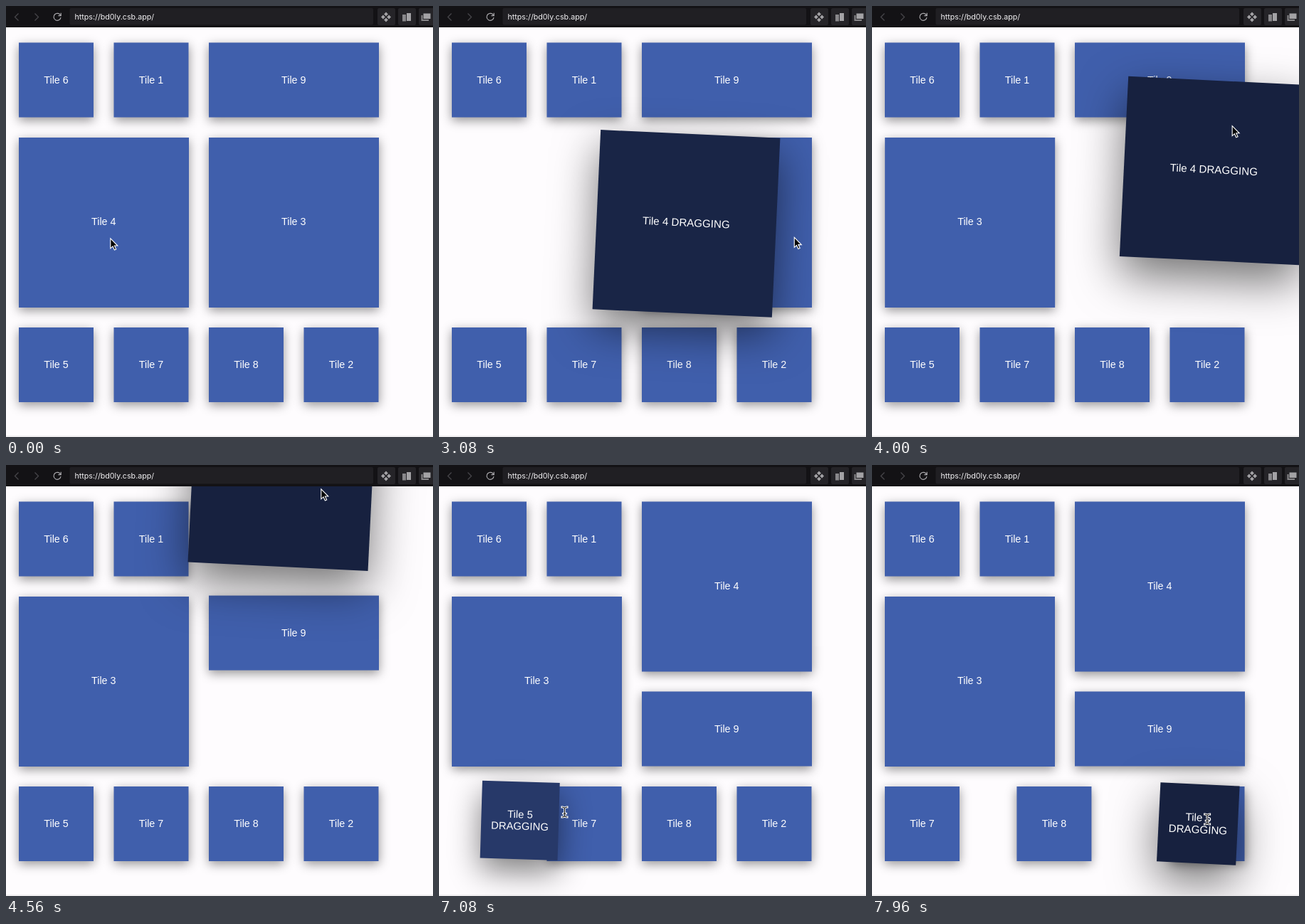
Animation, 600 px wide and 606 px high, one loop 8000 ms. Source, as an HTML page:

```html
<!DOCTYPE html>
<html lang="en">
<head>
<meta charset="utf-8">
<title>Draggable tiles</title>
<style>
  html, body { margin: 0; width: 100%; height: 100%; overflow: hidden; background: #fefcfe; }
  #stage { position: relative; width: 600px; height: 606px; overflow: hidden; }
  .tile {
    position: absolute; left: 0; top: 0;
    display: flex; align-items: center; justify-content: center; text-align: center;
    color: #fff; font: 14.3px/15.7px "Liberation Sans", Arial, sans-serif;
  }
  svg { position: absolute; left: 0; top: 0; z-index: 10; pointer-events: none; }
</style>
</head>
<body>
<div id="stage">
  <svg width="600" height="606" viewBox="0 0 600 606">
    <rect y="604.5" width="600" height="1" fill="#e2e0e2"/>
    <rect width="600" height="30" fill="#131215"/>
    <rect x="89.5" y="3" width="426.5" height="23.5" rx="2" fill="#201f23"/>
    <g fill="none" stroke="#47464a" stroke-width="1.3">
      <path d="M17.5 10.5L12.5 15.5L17.5 20.5"/>
      <path d="M40.5 10.5L45.5 15.5L40.5 20.5"/>
      <path d="M76.6 13.2A5 5 0 1 0 77 16.2M77.2 9.8V13.6H73.4" stroke="#aaa9ad" stroke-width="1.2"/>
    </g>
    <text x="96.5" y="19" fill="#f3f2f4" font-family="Inter, sans-serif" font-size="10.7">https://bd0ly.csb.app/</text>
    <g fill="#252428">
      <rect x="522" y="3" width="25" height="24" rx="2"/>
      <rect x="551" y="3" width="25" height="24" rx="2"/>
      <rect x="580" y="3" width="25" height="24" rx="2"/>
    </g>
    <g fill="#a3a2a5">
      <path d="M534 8.5l2.9 2.9-2.9 2.9-2.9-2.9zM534 16.7l2.9 2.9-2.9 2.9-2.9-2.9zM529.9 12.6l2.9 2.9-2.9 2.9-2.9-2.9zM538.1 12.6l2.9 2.9-2.9 2.9-2.9-2.9z"/>
      <rect x="557" y="12" width="7" height="9.5" fill="#88878a"/>
      <rect x="562.5" y="9.5" width="7" height="12" stroke="#252428"/>
      <rect x="583.5" y="13" width="10.5" height="8" fill="#88878a"/>
      <rect x="586" y="10" width="11" height="8.5" stroke="#252428"/>
    </g>
    <g id="cursor">
      <path id="arrow" d="M.8 .8V14.8L4 11.9L6.4 17L8.7 16L6.4 11H10.8Z" fill="#000" stroke="#fff" stroke-width="1.1"/>
      <g id="beam" fill="none">
        <path id="beamLine" d="M-3.6 -7Q0 -7 0 -4.5V4.5Q0 7 -3.6 7M3.6 -7Q0 -7 0 -4.5V4.5Q0 7 3.6 7M-2 2.2H2" stroke="#fff" stroke-width="2.8" stroke-linecap="square"/>
        <use href="#beamLine" id="beamCore"/>
        <path d="M-3.6 -7Q0 -7 0 -4.5V4.5Q0 7 -3.6 7M3.6 -7Q0 -7 0 -4.5V4.5Q0 7 3.6 7M-2 2.2H2" stroke="#111" stroke-width="1.1"/>
      </g>
    </g>
  </svg>
</div>
<script>
const LOOP = 8000, PITCH = 133.5, CELL = 105;
const FOLLOW = 0.016, LIFT = 0.009;
const BEAM_FROM = 6400;

// Pointer path: time, x, y
const path = [
  [0, 146, 326], [300, 146, 326], [1900, 326, 318], [2160, 326, 318],
  [2480, 193.5, 322.5], [2600, 193.5, 322.5], [3250, 562, 325], [3560, 565, 325],
  [3700, 565, 325], [4270, 449, 34], [4560, 442, 33], [4960, 450, 14],
  [5080, 450, 14], [5660, 216, 118], [5900, 216, 118], [6440, 72, 497],
  [6850, 72, 497], [7080, 176, 488], [7500, 422, 494], [7960, 471, 498], [8060, 481, 499]
];

// Tiles: number, column, row, width and height in cells, later moves (time, columns, rows), drag span
const tiles = [
  { n: 6, c: 0, r: 0, w: 1, h: 1 },
  { n: 1, c: 1, r: 0, w: 1, h: 1 },
  { n: 9, c: 2, r: 0, w: 2, h: 1, moves: [[4150, 0, 1], [5060, 0, 1]] },
  { n: 4, c: 0, r: 1, w: 2, h: 2, drag: [2580, 5060], drop: [2, -1] },
  { n: 3, c: 2, r: 1, w: 2, h: 2, moves: [[3385, -2, 0]] },
  { n: 5, c: 0, r: 3, w: 1, h: 1, drag: [6850, LOOP] },
  { n: 7, c: 1, r: 3, w: 1, h: 1, moves: [[7250, -1, 0]] },
  { n: 8, c: 2, r: 3, w: 1, h: 1, moves: [[7832, -1, 0]] },
  { n: 2, c: 3, r: 3, w: 1, h: 1 }
];

const $ = id => document.getElementById(id);
const mix = (a, b, k) => a + (b - a) * k;
const clamp = (v, lo, hi) => Math.min(hi, Math.max(lo, v));
const size = cells => CELL + (cells - 1) * PITCH;

// Critically damped step response
const spring = (t, rate) => t <= 0 ? 0 : 1 - (1 + rate * t) * Math.exp(-rate * t);

const slope = (i, k) => (path[i + 1][k] - path[i][k]) / (path[i + 1][0] - path[i][0]);

function tangent(i, k) {
  if (i === 0 || i === path.length - 1) return 0;
  const a = slope(i - 1, k), b = slope(i, k);
  return a * b <= 0 ? 0 : 2 * a * b / (a + b);
}

// Monotone cubic through the path points
function pointer(t) {
  let i = 0;
  while (i < path.length - 2 && path[i + 1][0] <= t) i++;
  const span = path[i + 1][0] - path[i][0];
  const u = clamp((t - path[i][0]) / span, 0, 1), v = 1 - u;
  return [1, 2].map(k =>
    path[i][k] * v * v * (1 + 2 * u) + path[i + 1][k] * u * u * (3 - 2 * u) +
    span * (tangent(i, k) * u * v * v - tangent(i + 1, k) * u * u * v));
}

// Pointer travel since the grab, smoothed by the follow spring
function dragOffset(t, [from, to]) {
  if (t <= from) return [0, 0];
  const start = pointer(from);
  let x = 0, y = 0, total = 0;
  for (let s = 2; s < 520; s += 4) {
    const weight = s * Math.exp(-FOLLOW * s);
    const p = pointer(clamp(t - s, from, to));
    x += (p[0] - start[0]) * weight;
    y += (p[1] - start[1]) * weight;
    total += weight;
  }
  return [x / total, y / total];
}

function position(tile, t) {
  let x = 18 + tile.c * PITCH, y = 51.5 + tile.r * PITCH;
  for (const [at, dc, dr] of tile.moves || []) {
    const k = spring(t - at, FOLLOW) * PITCH;
    x += dc * k;
    y += dr * k;
  }
  if (tile.drag) {
    const [dx, dy] = dragOffset(t, tile.drag);
    x += dx;
    y += dy;
    if (tile.drop) {
      const [from, to] = tile.drag;
      const a = pointer(from), b = pointer(to), k = spring(t - to, FOLLOW);
      x += (tile.drop[0] * PITCH - (b[0] - a[0])) * k;
      y += (tile.drop[1] * PITCH - (b[1] - a[1])) * k;
    }
  }
  return [x, y];
}

function drawTile(tile, t) {
  const [from, to] = tile.drag || [LOOP, LOOP];
  const lift = spring(t - from, LIFT) - spring(t - to, LIFT);
  const held = t >= from && t < to;
  const [x, y] = position(tile, t);
  const style = tile.el.style;
  const label = `Tile ${tile.n}${held ? " DRAGGING" : ""}`;
  if (tile.el.textContent !== label) tile.el.textContent = label;
  style.transform = `translate(${x}px,${y}px) rotate(${2.8 * lift}deg) scale(${1 + 0.06 * lift})`;
  style.background = `rgb(${mix(64, 23, lift)},${mix(95, 33, lift)},${mix(172, 63, lift)})`;
  style.boxShadow = `0 ${mix(4, 24, lift)}px ${mix(14, 60, lift)}px rgba(0,0,0,${mix(0.42, 0.55, lift)})`;
  style.zIndex = held || lift > 0.01 ? 5 : 1;
}

function draw(t) {
  tiles.forEach(tile => drawTile(tile, t));
  const [x, y] = pointer(t);
  const beam = t >= BEAM_FROM;
  $("cursor").setAttribute("transform", `translate(${x} ${y})`);
  $("arrow").style.display = beam ? "none" : "";
  $("beam").style.display = beam ? "" : "none";
}

for (const tile of tiles) {
  tile.el = document.createElement("div");
  tile.el.className = "tile";
  tile.el.style.width = size(tile.w) + "px";
  tile.el.style.height = size(tile.h) + "px";
  $("stage").append(tile.el);
}
$("beamCore").remove();

const begin = performance.now();
function tick() {
  draw((performance.now() - begin) % LOOP);
  requestAnimationFrame(tick);
}
tick();
</script>
</body>
</html>
```
